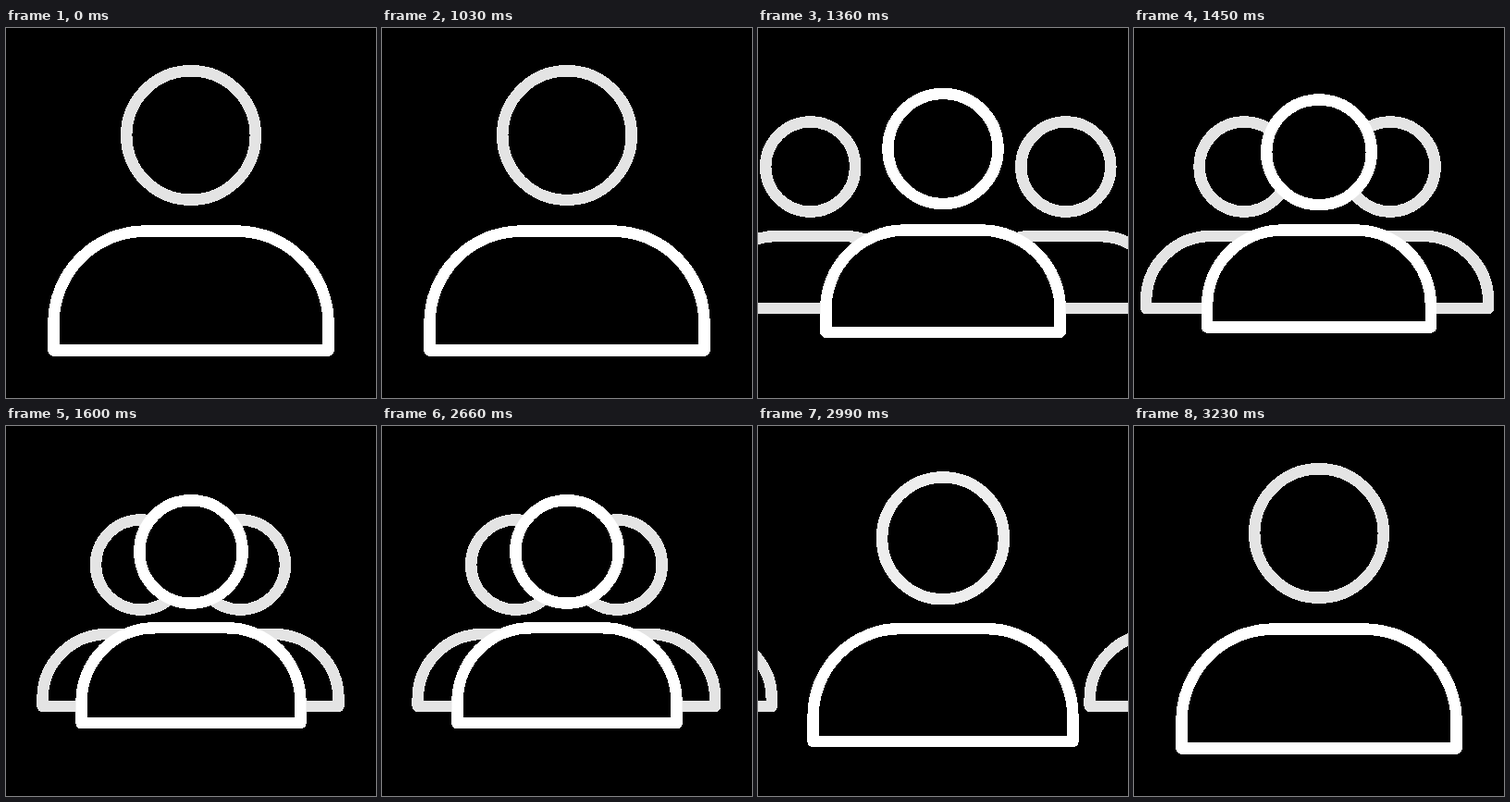
Recreate the animation shown at these times as an HTML page with a canvas. Size 400 by 400 pixels, loop 3260 ms.

```html
<!DOCTYPE html>
<html lang="en">
<head>
<meta charset="utf-8">
<title>One person, many people</title>
<style>
html, body { margin: 0; width: 100%; height: 100%; overflow: hidden; background: #000; }
canvas { display: block; width: 400px; height: 400px; image-rendering: pixelated; }
</style>
</head>
<body>
<canvas id="stage" width="400" height="400"></canvas>
<script>
const SIZE = 400;
const LOOP = 3260, STEP = 30, MOVE = 600;
const OPEN_AT = 1000, CLOSE_AT = 2630;
const GREY = 228;
const CUTOFF = 64; // least alpha that counts as solid

const canvas = document.getElementById('stage');
const ctx = canvas.getContext('2d', { willReadFrequently: true });
ctx.lineWidth = 12;
ctx.lineJoin = 'round';

const lerp = (a, b, p) => a + (b - a) * p;
const clamp = v => Math.min(1, Math.max(0, v));
const tone = v => `rgb(${v},${v},${v})`;

// cubic-bezier(.6, 0, .4, 1), solved by bisection
function ease(x) {
  if (x <= 0 || x >= 1) return clamp(x);
  let lo = 0, hi = 1;
  for (let i = 0; i < 30; i++) {
    const s = (lo + hi) / 2, r = 1 - s;
    if (1.8 * s * r * r + 1.2 * s * s * r + s * s * s < x) lo = s;
    else hi = s;
  }
  return lo * lo * (3 - 2 * lo);
}

// Share of the move done since its start, in whole steps
const moved = (t, start) => clamp(Math.floor((t - start) / STEP) * STEP / MOVE);

// Clear what lies behind the shape, then outline it
function paint(color) {
  ctx.globalCompositeOperation = 'destination-out';
  ctx.fill();
  ctx.globalCompositeOperation = 'source-over';
  ctx.strokeStyle = color;
  ctx.stroke();
}

function head(x, y, r, color) {
  ctx.beginPath();
  ctx.arc(x, y, r, 0, Math.PI * 2);
  paint(color);
}

function torso(x, top, bottom, half, r, color) {
  ctx.beginPath();
  ctx.moveTo(x - half, bottom);
  ctx.lineTo(x - half, top + r);
  ctx.arc(x - half + r, top + r, r, Math.PI, Math.PI * 1.5);
  ctx.arc(x + half - r, top + r, r, Math.PI * 1.5, Math.PI * 2);
  ctx.lineTo(x + half, bottom);
  ctx.closePath();
  paint(color);
}

function sidePerson(x) {
  head(x, 150, 48.5, tone(GREY));
  torso(x, 225, 303, 106, 70, tone(GREY));
}

function mainPerson(p) {
  const s = lerp(1, 0.797, p);
  const y = v => 214 + (v - 214) * s;
  head(200, y(116), 69.8 * s, tone(Math.round(lerp(GREY, 255, clamp(p * 1.3)))));
  torso(200, y(219.4), y(348.6), 148.6 * s, 100 * s, '#fff');
}

// Turn soft edges into hard pixel steps
function harden() {
  const image = ctx.getImageData(0, 0, SIZE, SIZE);
  const data = image.data;
  for (let i = 3; i < data.length; i += 4) data[i] = data[i] > CUTOFF ? 255 : 0;
  ctx.putImageData(image, 0, 0);
}

function draw(t) {
  const p = ease(moved(t, OPEN_AT) - moved(t, CLOSE_AT));
  ctx.clearRect(0, 0, SIZE, SIZE);
  sidePerson(lerp(-180, 145.5, p));
  sidePerson(lerp(544, 253.5, p));
  mainPerson(p);
  harden();
}

const begin = performance.now();
function tick() {
  draw((performance.now() - begin) % LOOP);
  requestAnimationFrame(tick);
}
tick();
</script>
</body>
</html>
```
